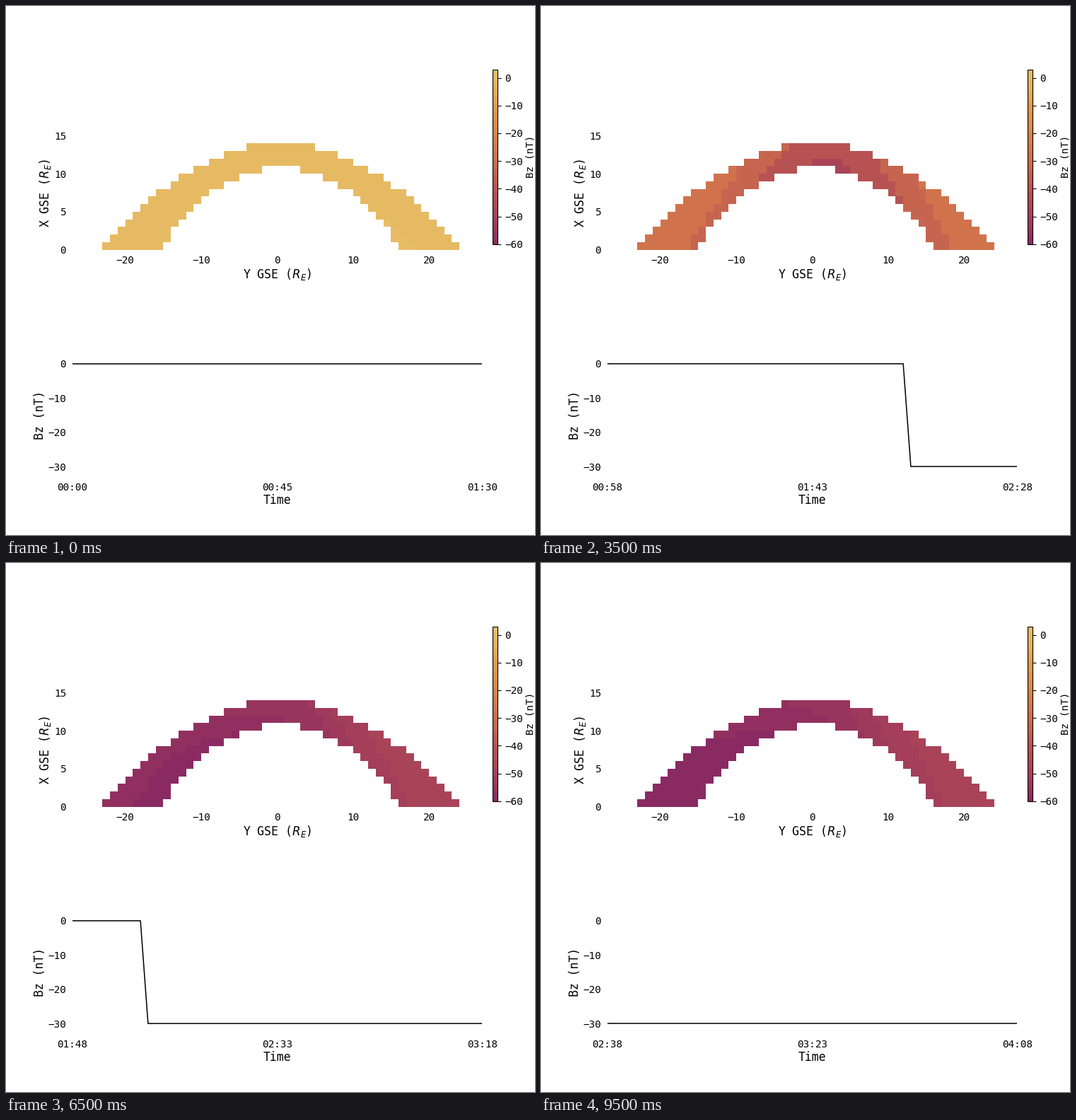
These frames come from a looping animation (748 by 748 pixels, 9600 ms). A matplotlib script:

```python
import matplotlib.pyplot as plt
import numpy as np
from matplotlib.animation import FuncAnimation
from matplotlib.colors import LinearSegmentedColormap

SIZE, DPI = 748, 100
FRAMES, INTERVAL = 96, 100
WINDOW = 54            # samples across the time axis
DROP = 75              # first sample with southward Bz
VMIN, VMAX = -60, 3
LABEL_PAD = 1.5

plt.rcParams.update({
    "font.family": "DejaVu Sans Mono",
    "font.size": 10.4,
    "axes.labelsize": 11.9,
})

COLORS = [
    (-60, "#8a2a62"), (-50, "#a74159"), (-40, "#b95452"), (-30, "#cd6e4d"),
    (-20, "#da864a"), (-10, "#e59c4e"), (-5, "#e8ac58"), (0, "#e6ba62"),
    (3, "#e9bf68"),
]
cmap = LinearSegmentedColormap.from_list(
    "bz", [((v - VMIN) / (VMAX - VMIN), c) for v, c in COLORS])
LEVELS = np.array([2, 0, -6, -12, -18, -23, -28, -33.5, -41, -48.5,
                   -51, -53, -55, -57.5, -60])

# Half-widths of the sheath and of the hole inside it, row by row
OUTER = np.array([23, 22, 21, 20, 19, 18, 17, 16, 14, 13, 11, 9, 7, 4])
INNER = np.array([15, 14, 14, 13, 12, 11, 10, 9, 7, 5, 2, -1, -1, -1])

col, row = np.meshgrid(np.arange(-23, 24), np.arange(14))
outside = (abs(col) > OUTER[:, None]) | (abs(col) <= INNER[:, None])

# 0 at the outer boundary, 1 at the inner one
x_out = 14 - 0.0248 * col**2
x_in = 11 - 0.0458 * col**2
depth = np.clip((x_out - row - 0.5) / (x_out - x_in), 0, 1)
left, right = np.maximum(-col, 0), np.maximum(col, 0)

quiet = np.where((col > 0) & (row < 4) & (depth > 0.65), 2.0, 0.0)
arrival = -(41 + 6 * depth - 15 * (1 - np.exp(-((col - 2) / 10)**2)))
draped = -(50 + 6 * depth - 0.02 * right**2 - 0.0065 * left**2
           + 0.25 * left * depth)
settled = -(55.3 + 1.5 * depth + left * (0.22 + 0.2 * depth)
            - 6.8 * (1 - np.exp(-(right / 9)**2)))
settled = np.maximum(settled, VMIN)


def mix(a, b, u):
    return a + (b - a) * u


def field(i):
    if i <= 20:
        values = quiet
    elif i <= 35:
        values = mix(quiet, arrival, 1 - (1 - (i - 20) / 15)**1.5)
    elif i <= 53:
        u = (i - 35) / 18
        values = mix(arrival, draped, u * (1.4 - 0.4 * u))
    else:
        values = mix(draped, settled, np.interp(i, [53, 65, 76], [0, 0.85, 1]))
    nearest = abs(values[..., None] - LEVELS).argmin(axis=-1)
    return np.ma.array(LEVELS[nearest], mask=outside)


def clock(minutes):
    return f"{minutes // 60:02d}:{minutes % 60:02d}"


def add_axes(x0, y0, x1, y1):
    """Axes from pixel corners measured from the top left."""
    return fig.add_axes([x0 / SIZE, 1 - y1 / SIZE,
                         (x1 - x0) / SIZE, (y1 - y0) / SIZE])


def strip(ax):
    ax.spines[:].set_visible(False)
    ax.patch.set_visible(False)
    ax.tick_params(length=0, pad=6)


fig = plt.figure(figsize=(SIZE / DPI, SIZE / DPI), dpi=DPI, facecolor="white")

sheath = add_axes(93.5, 183.5, 673.2, 344.5)
mesh = sheath.pcolormesh(np.arange(-23, 25), np.arange(15), field(0),
                         cmap=cmap, vmin=VMIN, vmax=VMAX)
sheath.set(xlim=(-27, 27), ylim=(0, 15),
           xticks=range(-20, 21, 10), yticks=range(0, 16, 5))
sheath.set_xlabel("Y GSE ($R_E$)", labelpad=LABEL_PAD)
sheath.set_ylabel("X GSE ($R_E$)", labelpad=LABEL_PAD)
strip(sheath)

bar_ax = add_axes(688.2, 89.8, 695.3, 336.8)
bar = fig.colorbar(mesh, cax=bar_ax, ticks=range(-60, 1, 10))
bar.set_label("Bz (nT)", size=10.4, labelpad=2.8)

series = add_axes(93.5, 418.7, 673.2, 665.7)
line, = series.plot([], [], color="black", lw=1.1)
series.set(xlim=(0, WINDOW), ylim=(-33, 18),
           xticks=[0, WINDOW / 2, WINDOW], yticks=range(-30, 1, 10))
series.set_xlabel("Time", labelpad=LABEL_PAD)
series.set_ylabel("Bz (nT)", y=18 / 51, labelpad=LABEL_PAD)
strip(series)

steps = np.arange(WINDOW + 2)


def update(i):
    mesh.set_array(field(i))
    line.set_data(steps, np.where(steps + i < DROP, 0, -30))
    start = i * 5 // 3
    series.set_xticklabels([clock(start + m) for m in (0, 45, 90)])
    return mesh, line


anim = FuncAnimation(fig, update, frames=FRAMES, interval=INTERVAL,
                     repeat=True, blit=False)
plt.show()
```
